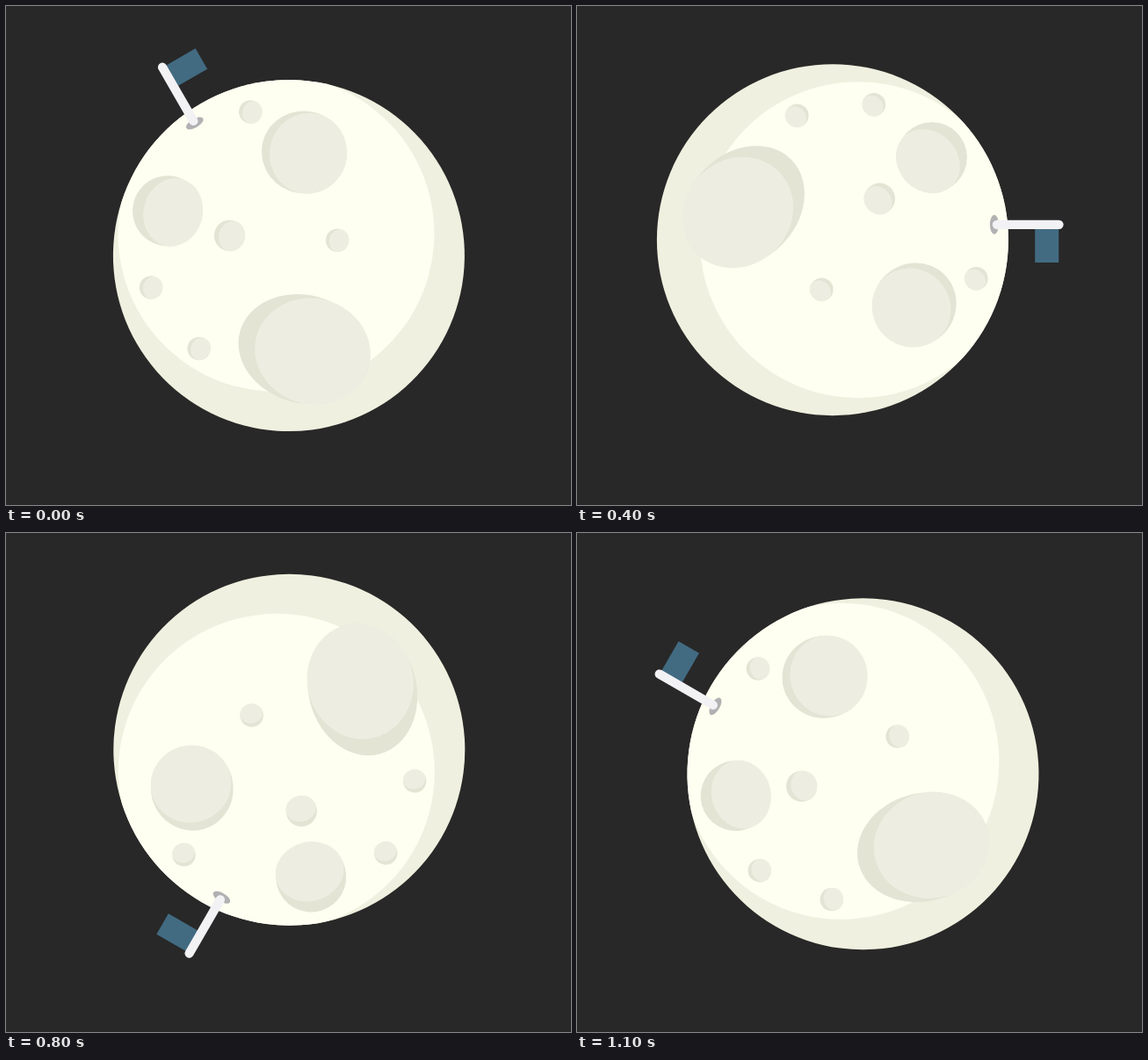
Recreate the animation shown at these times as an HTML page with a canvas. Size 643 by 568 pixels, loop 1200 ms.

```html
<!DOCTYPE html>
<html lang="en">
<head>
<meta charset="utf-8">
<title>Turning moon</title>
<style>
  html, body { margin: 0; width: 100%; height: 100%; overflow: hidden; background: #282828; }
  canvas { display: block; }
</style>
</head>
<body>
<canvas id="stage" width="643" height="568"></canvas>
<script>
const canvas = document.getElementById('stage');
const ctx = canvas.getContext('2d');
const STEP = 100, STEPS = 12, RADIUS = 200;
const PIVOT = { x: 310.1, y: 262.1 };
const REST = 4; // step at which the pole lies level

// Moon centre relative to the pivot, repeated every quarter turn
const WOBBLE = [{ x: 11.8, y: 22 }, { x: 4.1, y: 19.2 }, { x: -12.2, y: 15.4 }];

function ellipse(x, y, rx, ry, color) {
  ctx.fillStyle = color;
  ctx.beginPath();
  ctx.ellipse(x, y, rx, ry, 0, 0, Math.PI * 2);
  ctx.fill();
}

// The floor touches the far rim; the shade is the share of r left dark
function crater(x, y, r, stretch = 1, shade = 0.16) {
  const rim = r * stretch;
  const floor = rim - r * shade;
  ctx.save();
  ctx.translate(x, y);
  ctx.rotate(Math.PI * 0.75);
  ellipse(0, 0, rim, r, '#e3e4d4');
  ellipse(rim - floor, 0, floor, r * 0.98, '#edeee1');
  ctx.restore();
}

function pit(x, y) {
  crater(x, y, 13.2);
}

function surface() {
  ellipse(0, 0, RADIUS, RADIUS, '#eff0df');
  ctx.save();
  ctx.beginPath();
  ctx.arc(0, 0, RADIUS, 0, Math.PI * 2);
  ctx.clip();
  ellipse(29, 0, 180, 180, '#fefff0');
  ctx.restore();

  crater(-101, -38, 61.4, 1.236);
  crater(93, 74, 46.9, 1.036, 0.1);
  crater(113, -94, 40);
  crater(53.5, -47, 17.6);
  pit(-40.5, -141.5);
  pit(47, -154);
  pit(-12.5, 56.5);
  pit(163.5, 44);
}

function flag() {
  const y = -17.4;
  ellipse(184, y, 5, 11, '#b1b1b3');
  ctx.fillStyle = '#426b82';
  ctx.fillRect(230.3, y, 27, 43.2);
  ctx.strokeStyle = '#f2f1f4';
  ctx.lineWidth = 10.3;
  ctx.lineCap = 'round';
  ctx.beginPath();
  ctx.moveTo(187, y);
  ctx.lineTo(257.6, y);
  ctx.stroke();
}

function draw(time) {
  const step = Math.floor(time / STEP) % STEPS;
  const phase = step % WOBBLE.length;
  const offset = WOBBLE[phase];
  ctx.fillStyle = '#282828';
  ctx.fillRect(0, 0, canvas.width, canvas.height);
  ctx.save();
  ctx.translate(PIVOT.x, PIVOT.y);
  ctx.rotate((step - phase) * Math.PI / 6);
  ctx.translate(offset.x, offset.y);
  ctx.rotate((phase - REST) * Math.PI / 6);
  surface();
  flag();
  ctx.restore();
}

const start = performance.now();
function tick() {
  draw(performance.now() - start);
  requestAnimationFrame(tick);
}
tick();
</script>
</body>
</html>
```
